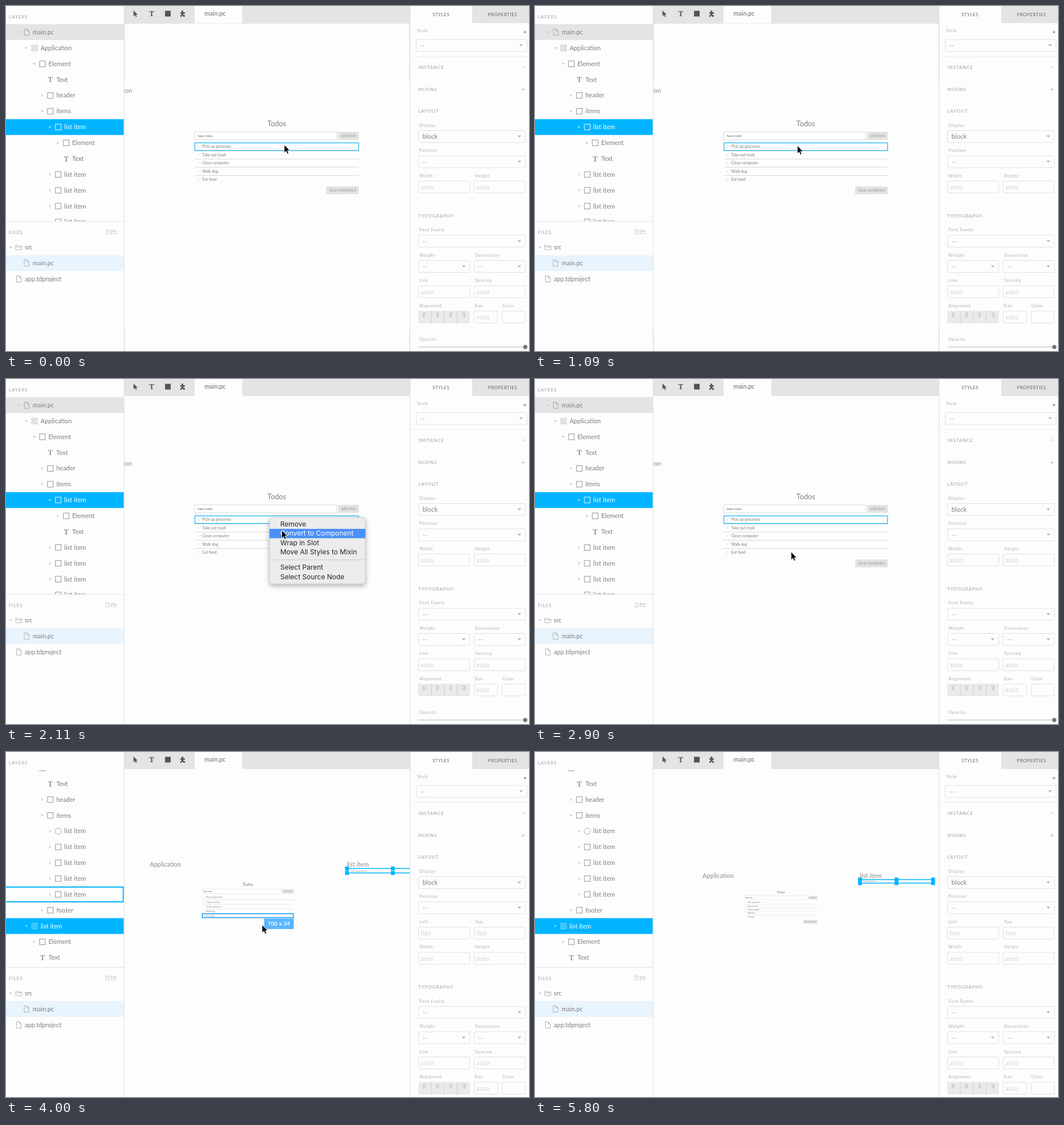
Animation, 921 px wide and 608 px high, one loop 6.55 s. Source, as an HTML page:

```html
<!DOCTYPE html>
<html lang="en">
<head>
<meta charset="utf-8">
<title>Convert to component</title>
<style>
  html, body { margin: 0; width: 100%; height: 100%; overflow: hidden; background: #fdfdfd; }
  svg { display: block; width: 100%; height: 100%; }
  text { font-family: Lato, "Open Sans", sans-serif; white-space: pre; }
  .menu text { font-family: Inter, Roboto, sans-serif; }
</style>
</head>
<body>
<svg id="stage" viewBox="0 0 921 608"></svg>
<script>
const LOOP = 6550;
const BLUE = '#00b4ff';
const INK = '#7e7e7e';
const ROW = 27.86;

// Markup helpers
const text = (x, y, s, size = 11, fill = INK, extra = '') =>
  `<text x="${x}" y="${y + size * 0.35}" font-size="${size}" fill="${fill}" ${extra}>${s}</text>`;
const rect = (x, y, w, h, fill, extra = '') =>
  `<rect x="${x}" y="${y}" width="${w}" height="${h}" fill="${fill}" ${extra}/>`;
const path = (d, stroke = '#bbb', width = 1, fill = 'none') =>
  `<path d="${d}" stroke="${stroke}" stroke-width="${width}" fill="${fill}"/>`;
const group = (id, body, extra = '') => `<g id="${id}" ${extra}>${body}</g>`;
const at = (x, y, body) => `<g transform="translate(${x} ${y})">${body}</g>`;
const label = (x, y, s) => text(x, y, s, 7.5, '#acacac', 'letter-spacing=".65"');
const heading = (x, y, s) => text(x, y, s, 8, '#a0a0a0', 'letter-spacing=".95"');

const pageIcon = (x, y, c = '#b0b0b0', k = 1) =>
  at(x, y, `<g transform="scale(${k})">${path('M-4 -5.5H1L4.3 -2V5.5H-4ZM1 -5.5V-2H4.3', c)}</g>`);
const folderIcon = (x, y, k = 1) =>
  at(x, y, `<g transform="scale(${k})">${path('M-5.5 -4H-1.5L-.5 -2.6H5.5V4H-5.5ZM-5.5 -1H5.5')}</g>`);

const icons = {
  page: c => pageIcon(0, 0, c),
  box: c => rect(-5, -5, 10, 10, 'none', `stroke="${c}" stroke-width="1.3"`),
  circle: c => `<circle r="5.5" fill="none" stroke="${c}"/>`,
  text: c => text(0, 0, 'T', 13, c, 'text-anchor="middle" font-weight="700" style="font-family:\'Noto Serif\',serif"'),
  parts: c => [[-5, -5], [1, -5], [-5, 1], [1, 1]].map(([x, y]) =>
    rect(x, y, 4, 4, 'none', `stroke="${c}" stroke-width=".9" rx=".8"`)).join('')
};
const arrow = (x, y, open, c = '#c8c8c8') =>
  at(x, y, path(open ? 'M-2.8 -1.3H2.8L0 1.8Z' : 'M-1.3 -2.6V2.6L1.8 0Z', 'none', 0, c));

// Layer tree; rows are [depth, icon, name, arrow, selected]
const treeRow = ([depth, icon, name, mark, selected], y) => {
  const x = 22 + 13.9 * depth;
  const c = selected ? '#fff' : INK;
  const iconColor = selected ? '#bfeaff' : icon === 'text' ? '#999' : '#aaa';
  return (selected ? rect(0, y - ROW / 2, 207.5, ROW, BLUE) : '') +
    (mark ? arrow(x, y, mark === 'v', selected ? '#8edcff' : undefined) : '') +
    at(x + 14.4, y, icons[icon](iconColor)) + text(x + 25, y, name, 11, c);
};
const tree = (rows, top) => rows.map((r, i) => treeRow(r, top + ROW * i)).join('');
const head = [[2, 'box', 'Element', 'v'], [3, 'text', 'Text'], [3, 'box', 'header', '>'], [3, 'box', 'items', 'v']];
const item = [4, 'box', 'list item', '>'];
const treeBefore = tree([
  [0, 'page', 'main.pc', 'v'], [1, 'parts', 'Application', 'v'], ...head,
  [4, 'box', 'list item', 'v', true], [5, 'box', 'Element', '>'], [5, 'text', 'Text'], item, item, item, item
], 46.2);
const treeAfter = tree([
  ...head, [4, 'circle', 'list item', '>'], item, item, item, item, [3, 'box', 'footer', '>'],
  [1, 'parts', 'list item', 'v', true], [2, 'box', 'Element', '>'], [2, 'text', 'Text']
], 28.1);

const leftPanel = () =>
  rect(0, 0, 208, 608, '#fdfdfd') + heading(5, 19, 'LAYERS') +
  `<g clip-path="url(#treeClip)">` +
  group('before', rect(0, 32, 207.5, 28, '#e4e4e4') + treeBefore) +
  group('after', treeAfter) +
  group('rowHover', rect(-1, 238, 207.5, 26, 'none', `stroke="${BLUE}" stroke-width="2"`)) +
  group('scrollbar', rect(199.5, 95, 6.5, 282, '#777', 'rx="2"')) + '</g>' +
  path('M0 379.5H208', '#e4e4e4') + heading(5, 399, 'FILES') +
  pageIcon(179, 398, '#bbb', .7) + folderIcon(189.5, 398, .75) +
  arrow(8.5, 425.5, true) + folderIcon(22.5, 425.5) + text(33, 425.5, 'src') +
  rect(0, 439, 207.5, 28, '#e8f4fe') + pageIcon(36, 453) + text(47, 453, 'main.pc') +
  pageIcon(22.5, 481) + text(33, 481, 'app.tdproject') +
  path('M208 0V608', '#dcdcdc');

// Style panel
const frame = (x, y, w, h = 22) => rect(x + .5, y + .5, w - 1, h - 1, '#fdfdfd', 'stroke="#e0e0e0" rx="1"');
const field = (x, y, w, value = '') =>
  frame(x, y, w) + text(x + 4, y + 11.5, value, 11, '#d2d2d2', 'letter-spacing=".5"');
const select = (x, y, w, value = '--') =>
  frame(x, y, w) + text(x + 7.5, y + 11.5, value, 11, value === '--' ? '#aaa' : INK, 'letter-spacing=".2"') +
  at(x + w - 11, y + 11, path('M-3.5 -2H3.5L0 2Z', 'none', 0, '#bcbcbc'));
const pair = (y, a, b, control, value) =>
  label(728, y, a) + label(826, y, b) + control(726, y + 9, 91, value) + control(824, y + 9, 91, value);
const plus = (x, y, c) => path(`M${x - 2.5} ${y}h5M${x} ${y - 2.5}v5`, c);

const alignIcon = i => [6, 3, 5, 3].map((w, k) => {
  const offset = [-3, -w / 2, -w / 2, 3 - w][i];
  return path(`M${737 + 23 * i + offset} ${541.5 + 2 * k}h${w}`, '#aaa', .8);
}).join('');
const typography = () =>
  heading(726, 370, 'TYPOGRAPHY') + label(728, 394.5, 'Font Family') + select(726, 403.5, 189) +
  pair(439, 'Weight', 'Decoration', select) + pair(483.5, 'Line', 'Spacing', field, 'auto') +
  label(728, 528, 'Alignment') + rect(726, 537, 91, 22, '#eaeaea') +
  path('M749 537v22M772 537v22M794.5 537v22', '#ccc') + [0, 1, 2, 3].map(alignIcon).join('') +
  label(825, 528, 'Size') + field(824, 537, 42, 'auto') + label(874, 528, 'Color') + field(873, 537, 42) +
  label(728, 587, 'Opacity') + path('M726 601H914', '#ccc', 1.5) + '<circle cx="914.5" cy="601" r="3.7" fill="#777"/>';

const tab = (x, s) => text(x, 15, s, 8, '#666', 'text-anchor="middle" letter-spacing=".5"');
const rightPanel = () =>
  rect(711.5, 0, 210, 608, '#fdfdfd') + rect(821, 0, 100, 30, '#e4e4e4') +
  tab(766, 'STYLES') + tab(874.5, 'PROPERTIES') +
  label(724, 43, 'Style') + plus(914, 46, '#777') + select(722, 58.5, 196) +
  path('M712 88.5H921', '#eee') + heading(726, 108, 'INSTANCE') +
  path('M909.5 107.5h4q1.5 1 0 3M911 106l-1.5 1.5l1.5 1.5', '#ccc', .8) +
  heading(726, 147, 'MIXINS') + plus(910.5, 147, '#bbb') + heading(726, 185.5, 'LAYOUT') +
  label(728, 210, 'Display') + select(726, 219, 189, 'block') +
  label(728, 254.5, 'Position') + select(726, 263.5, 189) +
  group('offsets', pair(299, 'Left', 'Top', field, '0px')) +
  group('lower', pair(299, 'Width', 'Height', field, 'auto') + typography()) +
  path('M711.5 0V608', '#dcdcdc');

const toolbar = () =>
  rect(208, 0, 503.5, 30, '#e4e4e4') + rect(332, 0, 84, 30.5, '#fdfdfd') + text(349.5, 13.5, 'main.pc', 11, '#666') +
  path('M224.5 8V18L227 15.8 228.8 19.5 230.4 18.7 228.7 15.2H232Z', 'none', 0, '#555') +
  at(256.5, 13.5, icons.text('#555')) + rect(280, 8.5, 10, 10, '#555') +
  path('M307 11h2.5q-1.2-3 1.2-3t1.2 3H315v2.8q-2.6-1-2.6 1t2.6 1V19h-3q.6-2-1.2-2t-1.2 2H307v-3q2.2.6 2.2-1.2T307 13.6Z', 'none', 0, '#555');

// Todo page, in its own units
const todos = ['Pick up groceries', 'Take out trash', 'Clean computer', 'Walk dog', 'Eat food'];
const todoLine = (x, y, s) =>
  path(`M${x} ${y + 6}v-9h4m4 0h5`, '#c8c8c8', 1.5) + text(x + 18, y, s, 16.4);
const button = (x, y, w, h, s) =>
  rect(x, y, w, h, '#e2e2e2') + text(x + w / 2, y + h / 2, s, 16.5, '#999', 'text-anchor="middle"');
const page = () =>
  text(750, 129, 'Todos', 31, INK, 'text-anchor="middle"') +
  rect(400, 163, 606, 34, '#fff', 'stroke="#d2d2d2" stroke-width="2"') + text(412, 181, 'New todo', 15, '#666') +
  button(1012, 163, 88, 34, 'add item') +
  todos.map((s, i) => todoLine(415, 226 + 35 * i, s) +
    (i < 4 ? path(`M400 ${244 + 35 * i}h700`, '#cacaca', 1.8) : '')).join('') +
  button(961, 396, 139, 33, 'clear completed');

const canvas = () =>
  group('world', page()) + group('componentText', todoLine(15, 17, todos[0])) +
  text(0, 0, 'Application', 11, '#8a8a8a', 'id="appLabel"') + text(0, 0, 'list item', 11, '#8a8a8a', 'id="itemLabel"') +
  rect(332.6, 241.2, 288.2, 13.4, 'none', 'id="picked" stroke="#2cbcf8" stroke-width="1.4"') +
  group('component', '') + group('hover', '') +
  group('focus', path('M208.7 133V30.7H710.8V133M208.7 572V608M710.8 572V608', '#cfe0f2'));

// Context menu
const entries = ['Remove', 'Convert to Component', 'Wrap in Slot', 'Move All Styles to Mixin', 'Select Parent', 'Select Source Node'];
const entryY = i => 255.6 + 16.5 * i + (i > 3 ? 10.4 : 0);
const menu = () =>
  rect(464, 244, 169, 117, '#ececec', 'rx="5" stroke="#c2c2c2" stroke-width=".8" filter="url(#shadow)"') +
  rect(464, 0, 169, 16.5, '#4c8ff8', 'id="bar"') + path('M464 318.7H633', '#d2d2d2', 1.3) +
  entries.map((s, i) => text(483, entryY(i), s, 12, '#262626', `id="entry${i}"`)).join('');

const beamShape = 'M-3 -6.5Q0 -6.5 0 -4.5Q0 -6.5 3 -6.5M0 -4.5V5M-3 7Q0 7 0 5Q0 7 3 7M-1.5 2h3';
const pointer =
  group('arrow', path('M0 0V14.2L3.2 11.2 5.3 16 7.7 15 5.7 10.4H10Z', '#fff', .8, '#000')) +
  group('beam', path(beamShape, '#fff', 2.4) + path(beamShape, '#222', 1.2));

document.getElementById('stage').innerHTML = `<defs>
  <clipPath id="treeClip"><rect y="32" width="208" height="347"/></clipPath>
  <clipPath id="canvasClip"><rect x="208" y="30" width="503.5" height="578"/></clipPath>
  <filter id="shadow" x="-20%" y="-20%" width="140%" height="150%">
    <feDropShadow dx="0" dy="3.5" stdDeviation="4" flood-opacity=".3"/></filter></defs>` +
  rect(0, 0, 921, 608, '#fdfdfd') + `<g clip-path="url(#canvasClip)">${canvas()}</g>` +
  toolbar() + leftPanel() + rightPanel() + group('menu', menu(), 'class="menu"') + group('pointer', pointer);

// Held keys: [time, ...values]
const steps = (t0, t1, n, from, to) => Array.from({ length: n }, (_, i) =>
  [t0 + (t1 - t0) * i / (n - 1), ...from.map((v, k) => v + (to[k] - v) * (i + 1) / n)]);
const held = (keys, t) => keys.filter(k => k[0] <= t + .5).pop().slice(1);

const pointerKeys = [
  [0, 490, 244.5], [270, 486, 247],
  ...steps(410, 970, 6, [486, 247], [462, 246]),
  [1840, 465, 247.5], [1990, 474, 257], [2110, 485.5, 266.5], [2220, 484, 272], [2310, 482, 275.5],
  ...steps(2640, 2900, 4, [482, 275.5], [451, 304.5]),
  [5360, 640, 412], [5480, 790, 513], [5680, 839.5, 560]
];
// scale and top left corner of the page
const viewKeys = [
  [0, .413, 167, 154.5], [3530, .327, 228, 184.5], [3647, .285, 240, 194], [3765, .258, 246, 199],
  [3882, .242, 250, 202], [4000, .2306, 253, 204],
  ...steps(4530, 4880, 4, [.2306, 253, 204], [.2225, 260, 207.5]), [5000, .184, 295, 223.5]
];
const menuKeys = [[0, 0], [1600, 1], [2727, .6], [2813, .2], [2900, 0]];
const barKeys = [[0, -1], [1990, 0], [2110, 1]];

const $ = id => document.getElementById(id);
const show = (id, on) => $(id).setAttribute('display', on ? 'inline' : 'none');
const place = (id, x, y, s = 1) => $(id).setAttribute('transform', `translate(${x} ${y}) scale(${s})`);

function render(t) {
  const converted = t >= 3290;
  const hovering = converted && t < 5360;
  const [s, x, y] = held(viewKeys, t);
  const itemX = x + 1507 * s, itemY = y + 1.3;

  show('before', !converted);
  show('after', converted);
  show('rowHover', hovering);
  show('scrollbar', converted && t < 3882);
  show('offsets', converted);
  place('lower', 0, converted ? 44.5 : 0);
  show('focus', t < 1600);
  show('picked', !converted);

  place('world', x, y, s);
  place('appLabel', x, y - 5.5);
  place('itemLabel', itemX, y - 5.5);
  place('componentText', itemX, itemY, s);
  for (const id of ['itemLabel', 'componentText', 'component']) show(id, converted);
  const w = 700 * s, h = 34 * s;
  $('component').innerHTML = rect(itemX, itemY, w, h, 'none', `stroke="${BLUE}" stroke-width="1.5"`) +
    [0, w / 2, w].map(dx => [0, h].map(dy =>
      rect(itemX + dx - 3.4, itemY + dy - 3.5, 6.8, 7, BLUE)).join('')).join('');

  show('hover', hovering);
  const hx = x + 400 * s, hy = y + 349 * s, right = hx + w;
  $('hover').innerHTML = rect(hx + .5, hy + .5, w - 1, h - 1, 'none', 'stroke="#45b0ff" stroke-width="2"') +
    rect(right - 52, hy + h + 1.3, 52, 18.5, '#58b6ff', 'rx="1"') +
    text(right - 26, hy + h + 10.5, '700 x 34', 9.2, '#fff', 'text-anchor="middle" font-weight="700" letter-spacing=".4"');

  const [opacity] = held(menuKeys, t), [active] = held(barKeys, t);
  $('menu').setAttribute('opacity', opacity);
  show('bar', active >= 0);
  $('bar').setAttribute('y', entryY(Math.max(active, 0)) - 8);
  entries.forEach((_, i) => $('entry' + i).setAttribute('fill', i === active ? '#fff' : '#262626'));

  const beam = t >= 4530 && t < 5360;
  place('pointer', ...held(pointerKeys, t));
  place('beam', .5, 2.5);
  show('beam', beam);
  show('arrow', !beam);
  show('pointer', t < 5800);
}

const start = performance.now();
function tick() {
  render((performance.now() - start) % LOOP);
  requestAnimationFrame(tick);
}
tick();
</script>
</body>
</html>
```
